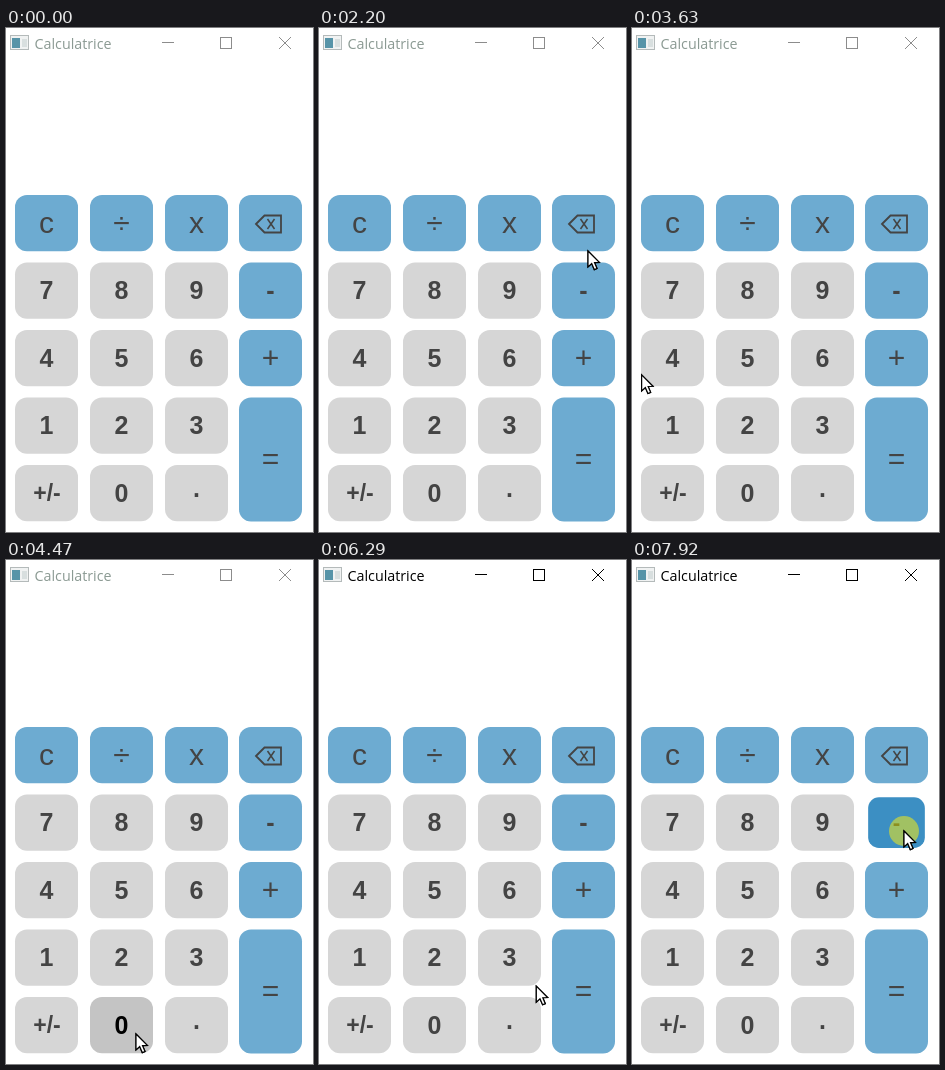
Recreate the animation shown at these times as an HTML page with a canvas. Size 307 px wide and 504 px high, loop 8000 ms.

```html
<!DOCTYPE html>
<html lang="fr">
<head>
<meta charset="utf-8">
<title>Calculatrice</title>
<style>
  html, body { margin: 0; overflow: hidden; background: #fff; }
  canvas { display: block; }
</style>
</head>
<body>
<canvas id="stage" width="307" height="504"></canvas>
<script>
const ctx = document.getElementById('stage').getContext('2d');
const LOOP = 8000, START = 590, STEP = 70, ACTIVE = 5140, HOVER_LAG = 40;
const SANS = '"Liberation Sans", Arial, sans-serif';
const INK = '#444';

const linear = k => k;
const smooth = k => k * k * (3 - 2 * k);

// The pointer enters from below, sweeps round the pad, then goes from stop to stop
const entry = [262, 497];
const moves = [
  { from: START, to: 2200, x: 269, y: 223, ease: linear },
  { from: 2200, to: 3040, x: 70, y: 200, ease: linear },
  { from: 3040, to: 3460, x: 2, y: 295, ease: linear },
  { from: 3460, to: 3900, x: 26, y: 458, ease: linear },
  { from: 3900, to: 4440, x: 130, y: 474, ease: smooth },
  { from: 4730, to: 5000, x: 61, y: 458, ease: smooth },
  { from: 5840, to: 6470, x: 272, y: 415, ease: smooth },
  { from: 6700, to: 7370, x: 272, y: 338, ease: smooth },
  { from: 7510, to: 7870, x: 272, y: 271, ease: smooth }
];
const presses = [[ACTIVE, 5590], [6490, 6700], [7370, 7510], [7855, LOOP]];

// The equals key spans two rows
const keys = ['c ÷ x ⌫', '7 8 9 -', '4 5 6 +', '1 2 3 =', '+/- 0 .'].flatMap((row, r) =>
  row.split(' ').map((label, c) => ({
    label,
    x: Math.round(9 + 74.75 * c),
    y: 167 + 67.5 * r,
    w: 63,
    h: label === '=' ? 124 : 56.3,
    blue: r === 0 || c === 3
  })));

const progress = (t, from, to) => Math.min(1, Math.max(0, (t - from) / (to - from)));

function pointerAt(t) {
  return moves.reduce(([px, py], { from, to, x, y, ease }) => {
    const k = ease(progress(t, from, to));
    return [px + (x - px) * k, py + (y - py) * k];
  }, entry);
}

function strokePath(points, color, width, close) {
  ctx.beginPath();
  points.forEach(([x, y]) => ctx.lineTo(x, y));
  if (close) ctx.closePath();
  ctx.strokeStyle = color;
  ctx.lineWidth = width;
  ctx.stroke();
}

function rect(x, y, w, h, color) {
  ctx.fillStyle = color;
  ctx.fillRect(x, y, w, h);
}

function text(label, x, y, font, color, align = 'center') {
  ctx.font = font;
  ctx.textAlign = align;
  ctx.fillStyle = color;
  ctx.fillText(label, x, y);
}

function cross(x, y, w, h, color, width) {
  strokePath([[x, y], [x + w, y + h]], color, width);
  strokePath([[x + w, y], [x, y + h]], color, width);
}

function drawTitleBar(active) {
  rect(4, 7, 19, 15, '#b4baba');
  rect(5, 8, 17, 13, '#f0f2f2');
  rect(6, 10, 8, 10, '#5794a8');
  rect(16, 11, 5, 8, '#d8dfdf');
  text('Calculatrice', 28.5, 21, '14.3px "Open Sans", "Noto Sans", sans-serif',
    active ? '#000' : '#8b9a93', 'left');
  const color = active ? '#000' : '#8c8c8c';
  rect(156, 14, 12, 1, color);
  ctx.strokeStyle = color;
  ctx.lineWidth = 1;
  ctx.strokeRect(214.5, 9.5, 11, 11);
  cross(273, 9, 12, 12, color, 1);
}

function drawLabel(label, color) {
  if (label === '⌫') {
    strokePath([[-14.5, 1], [-6, -7.5], [10.5, -7.5], [10.5, 9.5], [-6, 9.5]], color, 1.8, true);
    cross(-3, -4, 7, 10, color, 1.5);
  } else if ('c÷x+='.includes(label)) {
    text(label, 0, 10, '30px ' + SANS, color);
  } else if (label === '+/-') {
    text(label, 0.5, 8, 'bold 23px ' + SANS, color);
  } else {
    text(label, 0, label === '.' ? 4 : 9, 'bold 25px ' + SANS, color);
  }
}

function drawKey({ label, x, y, w, h, blue }, hover, scale) {
  ctx.save();
  ctx.translate(x + w / 2, y + h / 2);
  ctx.scale(scale, scale);
  ctx.fillStyle = blue ? (hover ? '#3c8fc3' : '#6dabd1') : (hover ? '#c4c4c4' : '#d6d6d6');
  ctx.beginPath();
  ctx.roundRect(-w / 2, -h / 2, w, h, 12);
  ctx.fill();
  ctx.translate(0, Math.floor(y + h / 2) - (y + h / 2));
  drawLabel(label, hover ? '#000' : INK);
  ctx.restore();
}

function drawPointer(x, y) {
  ctx.save();
  ctx.translate(x, y);
  const outline = [[0, 0], [0, 16], [3.7, 12.6], [6.3, 18.6], [9, 17.5], [6.5, 11.6], [11.3, 11.4]];
  strokePath(outline, '#000', 1.2, true);
  ctx.fillStyle = '#fff';
  ctx.fill();
  ctx.stroke();
  ctx.restore();
}

function draw(t) {
  rect(0, 0, 307, 504, '#fff');
  drawTitleBar(t >= ACTIVE);

  // The pointer is sampled in steps; hover trails it slightly
  const shown = t >= START;
  const sampled = START + Math.floor((t - START) / STEP) * STEP;
  const [x, y] = pointerAt(sampled);
  const [hx, hy] = pointerAt(sampled - HOVER_LAG);
  const press = presses.find(([from, to]) => t >= from && t < to);
  const depth = press ? progress(t, press[0], press[0] + 60) : 0;

  for (const key of keys) {
    const hover = shown && hx >= key.x && hx <= key.x + key.w && hy >= key.y && hy <= key.y + key.h;
    drawKey(key, hover, hover ? 1 - 0.1 * depth : 1);
  }
  if (press) {
    ctx.fillStyle = 'rgba(215,219,47,.65)';
    ctx.beginPath();
    ctx.arc(x, y, 15, 0, 2 * Math.PI);
    ctx.fill();
  }
  if (shown) drawPointer(x, y);
}

function frame() {
  draw(performance.now() % LOOP);
  requestAnimationFrame(frame);
}
frame();
</script>
</body>
</html>
```
